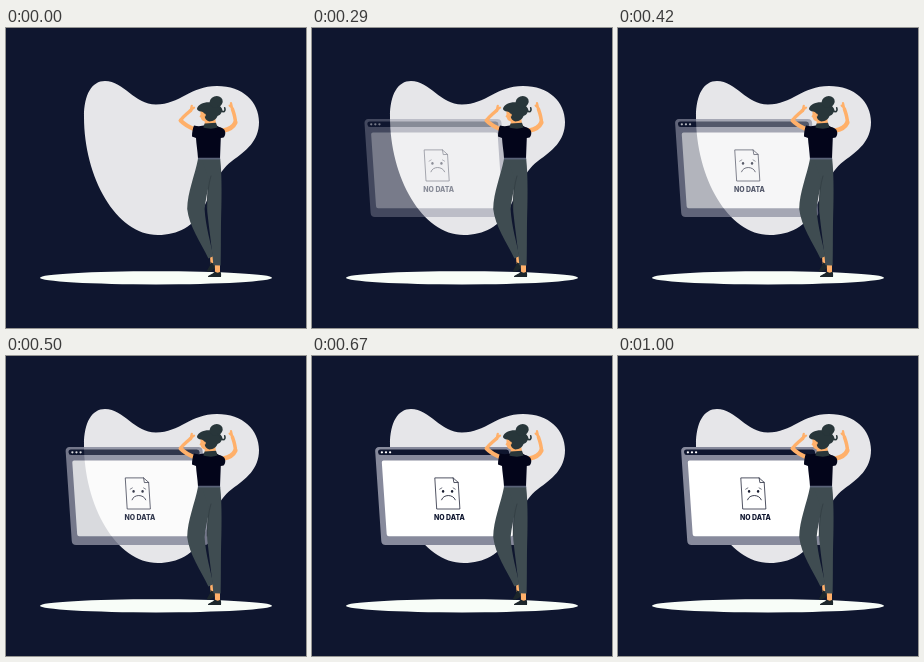
An HTML page with a canvas that plays this animation: 300 by 300 pixels, repeating every 1.04 s.

```html
<!DOCTYPE html>
<html lang="en">
<head>
<meta charset="utf-8">
<title>No data</title>
<style>
html, body { margin: 0; width: 100%; height: 100%; overflow: hidden; background: #0f162f; }
canvas { display: block; width: 300px; height: 300px; }
</style>
</head>
<body>
<canvas id="stage"></canvas>
<script>
const SIZE = 300, LOOP = 1040, FPS = 24;
const NAVY = '#0f162f', SKIN = '#ffb06a', HAIR = '#28363a', SHIRT = '#03051a';
const PANTS = '#3f4c51', GREY = '#878a9c';

const dpr = window.devicePixelRatio || 1;
const stage = document.getElementById('stage');
const ctx = setup(stage);
const layer = document.createElement('canvas');
const win = setup(layer);

function setup(c) {
  c.width = c.height = SIZE * dpr;
  const g = c.getContext('2d');
  g.scale(dpr, dpr);
  return g;
}

function fill(g, d, color) {
  g.fillStyle = color;
  g.fill(new Path2D(d));
}

function line(g, d, color, width) {
  g.strokeStyle = color;
  g.lineWidth = width;
  g.lineCap = g.lineJoin = 'round';
  g.stroke(new Path2D(d));
}

function oval(g, x, y, rx, ry, color, turn = 0) {
  g.fillStyle = color;
  g.beginPath();
  g.ellipse(x, y, rx, ry, turn, 0, Math.PI * 2);
  g.fill();
}

// Rounded box leaning with the window's slant.
function slanted(g, x, y, w, h, r, color) {
  g.save();
  g.transform(1, 0, 0.068, 1, x - 0.068 * y, 0);
  g.fillStyle = color;
  g.beginPath();
  g.roundRect(0, y, w, h, r);
  g.fill();
  g.restore();
}

function drawBackdrop(g) {
  g.fillStyle = NAVY;
  g.fillRect(0, 0, SIZE, SIZE);
  fill(g, 'M78 89C78 66 86 53 99 53C118 53 128 76.5 150 76.5C174 76.5 184 58 211 58' +
    'C237 58 253 74 253 94C253 113 240 123 226 133C210 145 206 164 197 181' +
    'C188 198 172 207 152 207C110 207 78 149 78 89Z', '#e6e6e9');
  oval(g, 150, 249.8, 116, 6.6, '#f8fdf8');
}

function drawWindow(g) {
  slanted(g, 63, 91, 137, 98, 4, GREY);
  slanted(g, 66, 93.6, 131, 5.4, 2.5, NAVY);
  for (const x of [70, 74.1, 78.2]) oval(g, x, 96.3, 1.15, 1.15, '#fff');
  slanted(g, 69.8, 104.6, 126.5, 75.6, 2, '#fff');

  line(g, 'M123.3 121.9L141.2 121.9L146.3 126.4L148 153L125.2 153Z', '#191d30', 0.75);
  line(g, 'M141.2 121.9L142 126.6L146.3 126.4', '#191d30', 0.75);
  oval(g, 131.2, 135.4, 1.2, 1.3, '#191d30');
  oval(g, 140.2, 135.4, 1.2, 1.3, '#191d30');
  line(g, 'M127.8 133.2L130 131.9M141.2 131.9L143.4 133.2', '#191d30', 0.6);
  line(g, 'M129.7 143.8C131.4 138 141.3 138 143.4 143.8', '#191d30', 0.85);

  g.fillStyle = NAVY;
  g.font = '800 6.9px Inter, Arial, sans-serif';
  g.textAlign = 'center';
  g.fillText('NO DATA', 137.5, 163.6);
}

function drawWoman(g) {
  // feet
  fill(g, 'M204 228L208.5 228L209.3 236L204.5 236Z', SKIN);
  fill(g, 'M204.5 233.8C206 236 208 235 209.3 234.6C210.2 238 209 241 206 242.6' +
    'C204 243.8 201.4 244 201 243.2C201.4 240.6 205 238 204.5 233.8Z', '#1c262b');
  fill(g, 'M208.8 235L214 235L214 246L209 246Z', SKIN);
  fill(g, 'M208.8 243.6C210.5 245 213 245 214.6 243.6C215.2 245.4 215.2 247.4 215 249' +
    'L202 249C201.6 247.4 206.5 246.6 208.8 243.6Z', '#1c262b');

  // legs
  fill(g, 'M192 131L208 131C206 148 200.5 163 198.6 181C199.5 198 204.5 214 207.3 228.2' +
    'L202.4 230.4C195 215 183 198 181.2 181C181.5 164 189 147 192 131Z', PANTS);
  fill(g, 'M196 131L214.2 131C216.2 149 215.6 175 215 195C214.8 210 215 224 214.6 237.4' +
    'L207.4 237.2C206 220 203 201 201.3 184C200.4 171 202.4 160 202 150Z', PANTS);
  line(g, 'M205 148C202.4 157 201.2 167 201.2 180', '#303c41', 0.7);

  // arms
  const arm = (d, w) => line(g, d, SKIN, w);
  arm('M189 101.5C183.5 99.2 178 96.2 174.7 92.6', 4.3);
  arm('M174.7 92.4C177 88.6 181 85.6 184.8 82.4', 3.5);
  arm('M184.7 82.2L185.8 77.8M185 81.8L188 79.6', 2.3);
  arm('M217.5 102.5C223 101.5 227.6 98.5 229.4 94.5', 4.4);
  arm('M229.4 94.5C229.4 89.5 227.8 85 226.4 81', 3.5);
  arm('M226.2 80.5L225 75.2M226 79.5L223.7 77.6', 2.3);

  // neck and torso
  fill(g, 'M199 90L209 89L210.5 99L198.5 99Z', SKIN);
  fill(g, 'M188 97.5C193 98.8 196 98 199 97L210 97C213 99.6 216 99 218.4 101.8' +
    'C220 105 219.4 107.6 217.6 109.6L214.8 110L214 130.4L192 130.4' +
    'C191.6 123 190.3 116 190 110L186 108.6C186 104 186.8 100.5 188 97.5Z', SHIRT);
  fill(g, 'M198.6 95.4L210 94.8L211.6 99.6C207 101.2 201.4 100.8 197.4 99.6Z', HAIR);
  fill(g, 'M192 129.8L214.1 129.8L214.2 131.6L191.8 131.6Z', '#596277');

  // head
  fill(g, 'M194.4 82L206 82L209.4 88C209 92 206.5 94 202.4 94C198 94 195.2 92.2 194.8 89.8' +
    'L193.5 88.6L194.5 86.8Z', SKIN);
  fill(g, 'M191 80.6C192 76.6 197 74 203.6 74.2C210 74.2 214.5 77 216.2 81.2' +
    'C216.6 84 214.5 87 211.5 88C210.6 91 207.6 93.4 203.2 93.4C200 92.6 198.8 90.4 198.7 88' +
    'C199 85.6 197.5 84 195.2 83.6C192.6 83.4 191 82.4 191 80.6Z', HAIR);
  oval(g, 210.2, 73.8, 6.6, 5.7, HAIR, -0.35);
  line(g, 'M212.5 78C214.8 80 215.2 83.5 217 83.8C219 83.8 219.4 81.6 218.7 79.8', HAIR, 1.6);
  oval(g, 198.7, 87.1, 1.1, 1.7, SKIN);
}

function render(now) {
  const t = now % LOOP;
  const step = Math.floor((t + 5.1) * FPS / 1000);
  const ms = step * 1000 / FPS;
  const alpha = Math.max(0, Math.min(1, (step - 1.7) / 12.2));
  // Eases to its rightmost point at 833 ms, then starts back.
  const dx = 1.1 - 26 * (1 - Math.cos(0.00184 * (ms - 833)));

  drawBackdrop(ctx);
  if (alpha > 0) {
    win.clearRect(0, 0, SIZE, SIZE);
    win.save();
    win.translate(dx, 0);
    drawWindow(win);
    win.restore();
    ctx.globalAlpha = alpha;
    ctx.drawImage(layer, 0, 0, SIZE, SIZE);
    ctx.globalAlpha = 1;
  }
  drawWoman(ctx);
}

const start = performance.now();
function tick() {
  render(performance.now() - start);
  requestAnimationFrame(tick);
}
tick();
</script>
</body>
</html>
```
